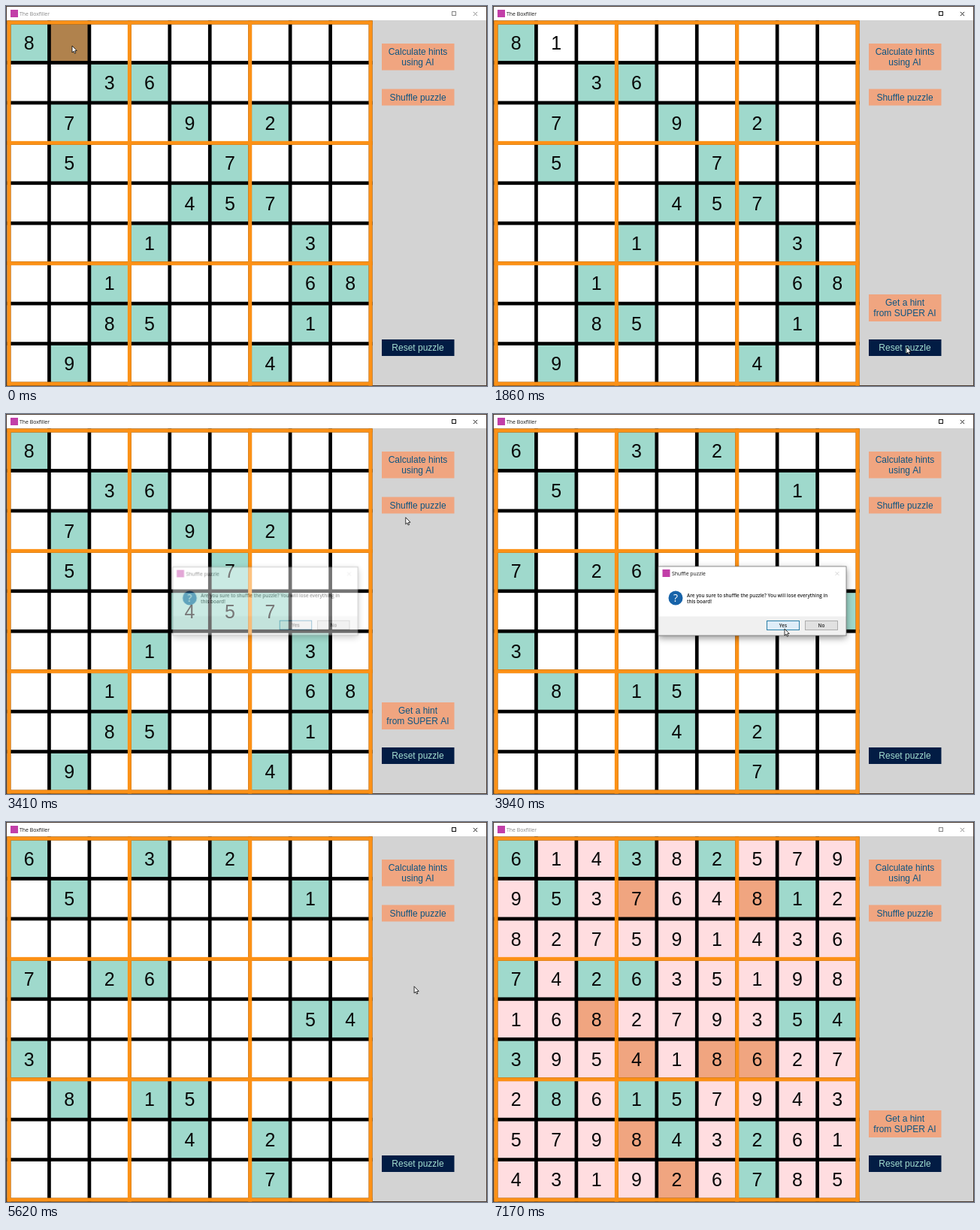
An HTML page with a canvas that plays this animation: 640x506 px, repeating every 7.24 s.

```html
<!DOCTYPE html>
<html lang="en">
<head>
<meta charset="utf-8">
<title>Sudoku board</title>
<style>
html, body { margin: 0; width: 100%; height: 100%; overflow: hidden; background: #d3d3d3 }
canvas { display: block }
</style>
</head>
<body>
<canvas id="stage" width="640" height="506"></canvas>
<script>
const ctx = document.getElementById('stage').getContext('2d');
const LOOP = 7240, LEFT = 4, TOP = 22, PITCH = 53.45;
const UI = '"Open Sans", sans-serif', ARIAL = '"Liberation Sans", Arial, sans-serif';
const TEAL = '#9fd9cc', PINK = '#ffdde0', SALMON = '#f0a580', BROWN = '#b0824d', ORANGE = '#fc9116', MAGENTA = '#c23fa8';

const FIRST = '8........' + '..36.....' + '.7..9.2..' + '.5...7...' + '....457..' +
  '...1...3.' + '..1....68' + '..85...1.' + '.9....4..';
const SECOND = '6..3.2...' + '.5.....1.' + '.........' + '7.26.....' + '.......54' +
  '3........' + '.8.15....' + '....4.2..' + '......7..';
const SOLVED = '614382579' + '953764812' + '827591436' + '742635198' + '168279354' +
  '395418627' + '286157943' + '579843261' + '431926785';
const EASY_HINTS = [6, 17, 19, 21, 28, 32, 47, 52, 53, 54];
const SUPER_HINTS = [12, 15, 38, 48, 50, 51, 66, 76];

const ASK_SUPER = { x: 220, w: 248, h: 91, icon: '?', title: 'No hints available', buttons: ['Yes', 'No'],
  lines: ["Sorry, the current method can't give you even one more hint!", 'Do you want to enable super AI mode?'] };
const NO_HINT = { x: 240, w: 210, h: 92, icon: 'i', title: 'No hints available', buttons: ['OK'],
  lines: ["Sorry, the current method can't give you any hint"] };
const ASK_SHUFFLE = { x: 220, w: 250, h: 92, icon: '?', title: 'Shuffle puzzle', buttons: ['Yes', 'No'],
  lines: ['Are you sure to shuffle the puzzle? You will lose everything in', 'this board!'] };
const EXISTS = { x: 240, w: 210, h: 92, icon: '!', title: 'Existing Warning', buttons: ['OK'],
  lines: ['This number already exists, please try another one!'] };

// dialog, start of opening, start of closing
const DIALOGS = [[ASK_SUPER, 934, 1470], [NO_HINT, 2300, 2810], [ASK_SHUFFLE, 3320, 3960],
  [EXISTS, 4860, 5120], [ASK_SUPER, 5890, 6230]];

// time, x, y of the pointer
const POINTER = [[0, 88, 53], [470, 88, 53], [800, 540, 70], [1120, 540, 70], [1400, 388, 283], [1500, 388, 283],
  [1850, 550, 454], [1980, 550, 454], [2200, 548, 402], [2320, 548, 402], [2620, 429, 281], [2850, 429, 281],
  [3200, 548, 121], [3340, 548, 121], [3700, 388, 286], [3990, 388, 286], [4270, 250, 103], [4430, 250, 103],
  [4550, 298, 103], [4780, 298, 103], [4960, 420, 280], [5150, 420, 280], [5420, 548, 455], [5500, 548, 455],
  [5710, 540, 70], [5910, 540, 70], [6170, 388, 283], [6300, 388, 283], [6480, 548, 402], [6930, 548, 402], [7070, 540, 70]];

const between = (t, a, b) => t >= a && t < b;
const clamp = v => Math.max(0, Math.min(1, v));

function rect(color, x, y, w, h, border) {
  ctx.fillStyle = color;
  ctx.fillRect(x, y, w, h);
  if (border) {
    ctx.strokeStyle = border;
    ctx.lineWidth = 1;
    ctx.strokeRect(x + .5, y + .5, w - 1, h - 1);
  }
}

function text(str, x, y, font, color, align = 'left') {
  ctx.font = font;
  ctx.fillStyle = color;
  ctx.textAlign = align;
  ctx.fillText(str, x, y);
}

function shape(color, ...points) {
  ctx.beginPath();
  points.forEach(p => ctx.lineTo(...p));
  ctx.closePath();
  ctx.fillStyle = color;
  ctx.fill();
}

function cross(x, y, r, color) {
  ctx.beginPath();
  ctx.moveTo(x - r, y - r); ctx.lineTo(x + r, y + r);
  ctx.moveTo(x + r, y - r); ctx.lineTo(x - r, y + r);
  ctx.strokeStyle = color;
  ctx.lineWidth = .9;
  ctx.stroke();
}

function drawWindow(t) {
  const active = between(t, 1140, 7100), ink = active ? '#111' : '#858585';
  rect('#4a3b32', 0, 0, 640, 506);
  rect('#fff', 1, 1, 638, 19);
  rect('#d3d3d3', 1, 19, 638, 486);
  rect(MAGENTA, 6, 5, 10, 10);
  text('The Boxfiller', 18, 13, '6.9px ' + UI, ink);
  ctx.strokeStyle = ink;
  ctx.lineWidth = 1;
  ctx.strokeRect(593.5, 7.5, 5, 5);
  cross(624.5, 10.5, 2.6, ink);
}

function drawButton(y, h, lines, bg = SALMON, ink = '#0c5582') {
  rect(bg, 500, y, 96.5, h);
  lines.forEach((line, i) => text(line, 548, y + 15.3 + i * 14, '12px ' + ARIAL, ink, 'center'));
}

function drawPanel(t) {
  drawButton(50, 35.5, ['Calculate hints', 'using AI']);
  drawButton(110.5, 22, ['Shuffle puzzle']);
  if (between(t, 1500, 3930) || t >= 6330) drawButton(384, 36, ['Get a hint', 'from SUPER AI']);
  drawButton(444, 22, ['Reset puzzle'], '#021c44', '#a4ddd0');
}

function cellAt(i, t) {
  const given = (t < 3930 ? FIRST : SECOND)[i];
  if (given != '.') return [given, TEAL];
  if (i == 1 && t < 400) return ['', BROWN];
  if (i == 1 && t < 1950) return ['1', '#fff'];
  if (i == 13 && between(t, 4300, 4420)) return ['', BROWN];
  if (i == 13 && between(t, 4420, 5450)) return ['9', '#fff'];
  if (i == 14 && between(t, 4580, 5120)) return ['', BROWN];
  const order = SUPER_HINTS.indexOf(i);
  if (order >= 0 && t >= 6530 + order * 50) return [SOLVED[i], SALMON];
  if (t >= (EASY_HINTS.includes(i) ? 5750 : 7090) && order < 0) return [SOLVED[i], PINK];
  return ['', '#fff'];
}

function drawBoard(t) {
  for (let i = 0; i < 81; i++) {
    const x = LEFT + i % 9 * PITCH, y = TOP + Math.floor(i / 9) * PITCH;
    const [digit, color] = cellAt(i, t);
    rect(color, x, y, PITCH + 1, PITCH + 1);
    text(digit, x + PITCH / 2, y + PITCH / 2 + 9, '25px ' + ARIAL, '#080808', 'center');
  }
  const grid = (color, step, width) => {
    for (let k = 0; k <= 9; k += step) {
      rect(color, LEFT + k * PITCH - width / 2, TOP - 2.5, width, 9 * PITCH + 5);
      rect(color, LEFT - 2.5, TOP + k * PITCH - width / 2, 9 * PITCH + 5, width);
    }
  };
  grid('#000', 1, 4.7);
  grid(ORANGE, 3, 5);
}

function drawIcon(kind, x, y) {
  if (kind == '!') {
    shape('#f8bd2c', [x, y - 9], [x + 10, y + 8.5], [x - 10, y + 8.5]);
    text('!', x, y + 6.5, '700 12px ' + UI, '#222', 'center');
    return;
  }
  ctx.beginPath();
  ctx.arc(x, y, 9.5, 0, 7);
  ctx.fillStyle = '#1763a9';
  ctx.fill();
  text(kind, x, y + 5, '14px ' + UI, '#fff', 'center');
}

function paintDialog(d, hover) {
  const y = 203, right = d.x + d.w;
  ctx.save();
  ctx.shadowColor = 'rgba(0,0,0,.45)';
  ctx.shadowBlur = 9;
  ctx.shadowOffsetY = 3;
  rect('#fff', d.x, y, d.w, d.h);
  ctx.restore();
  rect('#f0f0f0', d.x, y + 66.5, d.w, d.h - 66.5);
  ctx.strokeStyle = '#777';
  ctx.lineWidth = .8;
  ctx.strokeRect(d.x, y, d.w, d.h);
  rect(MAGENTA, d.x + 5.5, y + 4, 10, 10);
  text(d.title, d.x + 18, y + 12, '6.9px ' + UI, '#111');
  cross(right - 12, y + 9.5, 2.4, '#d0d0d0');
  drawIcon(d.icon, d.x + 23, y + 42);
  const base = d.lines.length > 1 ? 40.5 : 45;
  d.lines.forEach((line, i) => text(line, d.x + 38, y + base + i * 8, '600 6.4px ' + UI, '#222'));
  d.buttons.forEach((label, i) => {
    const x = right - 55 - 51 * (d.buttons.length - 1 - i);
    rect(i ? '#e1e1e1' : hover ? '#deedf8' : '#e4e4e4', x, y + 72, 44, 13, i ? '#adadad' : '#2a7fa8');
    text(label, x + 22, y + 81.3, '600 6.4px ' + UI, '#222', 'center');
  });
}

// Composited as one layer so the fade applies to the dialog as a whole.
const layer = document.createElement('canvas').getContext('2d');
layer.canvas.width = 640;
layer.canvas.height = 506;

function drawDialogs(t, [px, py]) {
  for (const [d, open, close] of DIALOGS) {
    const alpha = Math.min(clamp((t - open) / 200), 1 - clamp((t - close) / 200));
    if (alpha <= 0) continue;
    const bx = d.x + d.w - 55 - 51 * (d.buttons.length - 1);
    const hover = between(px, bx, bx + 44) && between(py, 275, 290);
    const cx = d.x + d.w / 2, cy = 203 + d.h / 2, scale = .975 + .025 * alpha;
    layer.clearRect(0, 0, 640, 506);
    withLayer(() => paintDialog(d, hover));
    ctx.save();
    ctx.globalAlpha = alpha;
    ctx.translate(cx, cy);
    ctx.scale(scale, scale);
    ctx.drawImage(layer.canvas, -cx, -cy);
    ctx.restore();
  }
}

function pointerAt(t) {
  const n = POINTER.findIndex(p => p[0] > t);
  if (n < 0) return POINTER.at(-1).slice(1);
  const [t0, x0, y0] = POINTER[n - 1], [t1, x1, y1] = POINTER[n];
  const u = (t - t0) / (t1 - t0), e = u * u * (3 - 2 * u);
  return [x0 + (x1 - x0) * e, y0 + (y1 - y0) * e];
}

function drawPointer([x, y]) {
  const outline = [[0, 0], [0, 9], [2, 7.2], [3.4, 10.2], [4.8, 9.6], [3.5, 6.7], [6.2, 6.5]];
  shape('#fff', ...outline.map(([a, b]) => [x + a, y + b]));
  ctx.strokeStyle = '#000';
  ctx.lineWidth = .8;
  ctx.stroke();
}

function draw(t) {
  const pointer = pointerAt(t);
  drawWindow(t);
  drawPanel(t);
  drawBoard(t);
  drawDialogs(t, pointer);
  if (t < 7110) drawPointer(pointer);
}
</script>
<script>
// Redirects the drawing helpers to the off-screen layer while paint runs.
function withLayer(paint) {
  const names = ['fillRect', 'strokeRect', 'fillText', 'beginPath', 'closePath', 'moveTo', 'lineTo', 'arc', 'fill', 'stroke', 'save', 'restore'];
  const props = ['fillStyle', 'strokeStyle', 'lineWidth', 'font', 'textAlign', 'shadowColor', 'shadowBlur', 'shadowOffsetY'];
  for (const name of names) ctx[name] = (...args) => layer[name](...args);
  for (const prop of props) Object.defineProperty(ctx, prop, { configurable: true, set: v => { layer[prop] = v; } });
  paint();
  for (const key of [...names, ...props]) delete ctx[key];
}

const start = performance.now();
function tick() {
  draw((performance.now() - start) % LOOP);
  requestAnimationFrame(tick);
}
tick();
</script>
</body>
</html>
```
